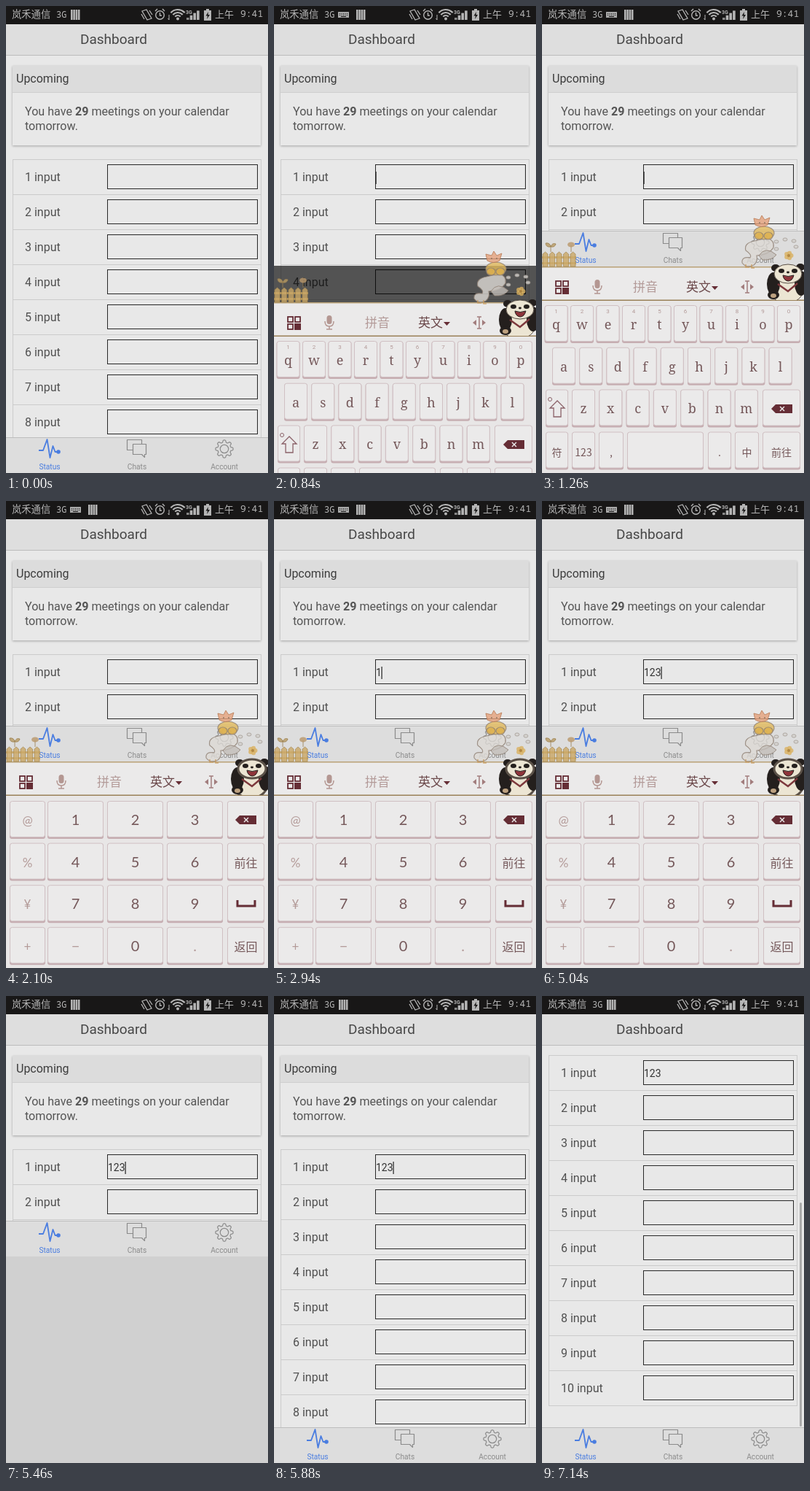
An HTML page with a canvas that plays this animation: 360 px wide and 640 px high, repeating every 8000 ms.

```html
<!DOCTYPE html>
<html lang="en">
<head>
<meta charset="utf-8">
<title>Dashboard input</title>
<style>
  html, body { margin: 0; width: 100%; height: 100%; overflow: hidden; background: #e8e8e8; }
  canvas { display: block; width: 360px; height: 640px; }
</style>
</head>
<body>
<canvas id="stage" width="360" height="640"></canvas>
<script>
const c = document.getElementById('stage').getContext('2d');
const LOOP = 8000, STEP = 420, LAST_STEP = 17;
const UI = 'Roboto, sans-serif';
const CJK = '"Noto Sans CJK SC", "Noto Sans CJK", sans-serif';
const MONO = '"Noto Sans Mono", monospace';
const DARK = '#652d35', PALE = '#b39a98', KEY_INK = '#75585a';

function text(s, x, y, size, color, { font = UI, align = 'left', weight = 400 } = {}) {
  c.font = `${weight} ${size}px ${font}`;
  c.textAlign = align;
  c.fillStyle = color;
  c.fillText(s, x, y);
}
function box(x, y, w, h, color) {
  c.fillStyle = color;
  c.fillRect(x, y, w, h);
}
function frame(x, y, w, h, color, width = 1) {
  c.strokeStyle = color;
  c.lineWidth = width;
  c.strokeRect(x + .5, y + .5, w - 1, h - 1);
}
function oval(x, y, rx, ry, fill, stroke) {
  c.beginPath();
  c.ellipse(x, y, rx, ry, 0, 0, 7);
  if (fill) { c.fillStyle = fill; c.fill(); }
  if (stroke) { c.strokeStyle = stroke; c.stroke(); }
}
function path(d, stroke, width = 1, fill) {
  const p = new Path2D(d);
  if (fill) { c.fillStyle = fill; c.fill(p); }
  if (stroke) { c.strokeStyle = stroke; c.lineWidth = width; c.stroke(p); }
}
function at(x, y, draw) {
  c.save();
  c.translate(x, y);
  draw();
  c.restore();
}

function statusBar(hasKeyboard) {
  const ink = '#b5b5b5', back = '#181717';
  box(0, 0, 360, 25, back);
  text('岚禾通信', 8, 16, 13.3, ink, { font: CJK });
  text('3G', 69, 16, 12, ink, { font: MONO });
  if (hasKeyboard) {
    box(88, 8, 15, 8, '#a8a8a8');
    for (let i = 0; i < 10; i++) box(90 + i % 5 * 2.5, 10 + (i > 4) * 2, 1, 1, back);
    box(92, 14, 7, 1, back);
  }
  for (let i = 0; i < 4; i++) box((hasKeyboard ? 113 : 89) + i * 3.3, 5, 2.6, 14, ink);
  path('M187 7L193 5L200 17L194 19ZM186 11L190 18M197 6L201 12', ink, 1.3);
  c.lineWidth = 1.4;
  oval(211.5, 12.5, 5.8, 5.8, null, ink);
  path('M211.5 9V13H214M205 7L208 4M218 7L215 4', ink, 1.4);
  path('M224 12V19M222.5 17L224 19', ink, 1);
  for (const r of [5, 9, 13]) {
    c.beginPath();
    c.arc(236, 18, r, -2.4, -.74);
    c.lineWidth = 2.2;
    c.stroke();
  }
  oval(236, 17.5, 2, 2, ink);
  text('3G', 247, 11, 7, ink, { weight: 700 });
  for (let i = 0; i < 4; i++) box(248 + i * 4.7, 16 - i * 3.2, 3.6, 3 + i * 3.2, i ? ink : '#888');
  box(272, 6, 10, 14, ink);
  box(275, 4, 4, 2, ink);
  path('M278 8L274.5 13.5H277L276 18L280 12H277.5Z', null, 1, back);
  text('上午', 287, 16, 13, ink, { font: CJK });
  text('9:41', 322, 15, 13, ink, { font: MONO });
}

function header() {
  box(0, 25, 360, 43, '#dedede');
  box(0, 67, 360, 1, '#bcbcbc');
  text('Dashboard', 102, 52, 19, '#474747');
}

function card() {
  c.save();
  c.shadowColor = 'rgba(0,0,0,.3)';
  c.shadowBlur = 3;
  c.shadowOffsetY = 1;
  box(9, 82, 341, 109, '#e8e8e8');
  c.restore();
  box(9, 82, 341, 36, '#dcdcdc');
  box(9, 118, 341, 1, '#cfcfcf');
  text('Upcoming', 14, 105, 16, '#3c3c3c');
  let x = 26;
  for (const [run, weight] of [['You have ', 400], ['29', 700], [' meetings on your calendar', 400]]) {
    text(run, x, 150, 16.1, '#555', { weight });
    x += c.measureText(run).width;
  }
  text('tomorrow.', 26, 170, 16.1, '#555');
}

function inputList(value, caret) {
  frame(9, 210, 342, 481, '#cbcbcb');
  for (let i = 0; i < 10; i++) {
    const y = 210 + i * 48;
    if (i) box(9, y, 342, 1, '#cbcbcb');
    text(`${i + 1} input`, 26, y + 30, 16, '#505050');
    frame(139, y + 7, 207, 34, '#282828');
  }
  text(value, 140, 240, 14, '#333');
  if (caret) box(139.5 + value.length * 8, 227, 1.2, 17, '#222');
}

function tabs() {
  box(0, 591, 360, 49, '#dddddd');
  box(0, 591, 360, 1, '#bdbdbd');
  const blue = '#4a7de0', gray = '#8b8b8b';
  c.lineJoin = 'round';
  path('M45 609H51L56.5 594L60.5 619L64.5 603L67.5 611H72', blue, 1.8);
  oval(72, 611, 2.8, 2.8, blue);
  path('M174 608.5H166.5V594.5H186.5V600M174.5 600.5H192.5V614.5H190.5V618.5L186.5 614.5H174.5Z', gray, 1.2);
  c.beginPath();
  for (let i = 0; i <= 96; i++) {
    const a = i / 96 * 2 * Math.PI, r = 10.6 + 1.5 * Math.tanh(2.5 * Math.cos(8 * a));
    c.lineTo(300 + r * Math.cos(a), 607 + r * Math.sin(a));
  }
  c.stroke();
  oval(300, 607, 5.7, 5.7, null, gray);
  ['Status', 'Chats', 'Account'].forEach((name, i) =>
    text(name, 60 + i * 120, 635, 10.2, i ? gray : blue, { align: 'center' }));
  c.lineJoin = 'miter';
}

function page({ short, value, caret, scroll, bar }) {
  const shift = short ? -283 : 0;
  box(0, 0, 360, 640, short ? '#d0d0d0' : '#e8e8e8');
  c.save();
  c.beginPath();
  c.rect(0, 68, 360, 523 + shift);
  c.clip();
  box(0, 68, 360, 572, '#e8e8e8');
  at(0, -scroll, () => { card(); inputList(value, caret); });
  if (bar) {
    c.beginPath();
    c.roundRect(354, bar[0], 3, bar[1], 1.5);
    c.fillStyle = '#aaa';
    c.fill();
  }
  c.restore();
  at(0, shift, tabs);
  header();
}

function key(x, y, w, label = '', size = 19, color = KEY_INK, font = 'Lato, sans-serif', weight = 400) {
  c.beginPath();
  c.roundRect(x, y + 1, w, 51, 3);
  c.fillStyle = '#c6adb1';
  c.fill();
  c.beginPath();
  c.roundRect(x + .5, y + .5, w - 1, 49, 3);
  c.fillStyle = '#ebeaea';
  c.fill();
  c.strokeStyle = '#d0c0c3';
  c.lineWidth = 1;
  c.stroke();
  text(label, x + w / 2, y + 33, size, color, { font, weight, align: 'center' });
}
function deleteIcon(y) {
  path(`M315 ${y}L321 ${y - 6}H344V${y + 6}H321Z`, null, 1, DARK);
  path(`M327 ${y - 3}L333 ${y + 3}M333 ${y - 3}L327 ${y + 3}`, '#eee', 1.4);
}

function numberKeys() {
  const columns = [[5, 49], [57, 77], [139, 77], [221, 77], [304, 51]];
  const rows = ['@123', '%456', '¥789', '+−0.'];
  rows.forEach((row, r) => columns.forEach(([x, w], i) => {
    const label = row[i] || ['', '前往', '', '返回'][r];
    const pale = i === 0 || '−.'.includes(label);
    const y = 411 + r * 57.6;
    if (i === 4) key(x, y, w, label, 16, KEY_INK, CJK, 300);
    else key(x, y, w, label, i ? 20 : 17, pale ? PALE : KEY_INK);
  }));
  deleteIcon(437);
  path('M318 547V555H342V547', DARK, 3);
}

function letterKeys() {
  const serif = '"Noto Serif", serif';
  [['qwertyuiop', 19.5, 35.5], ['asdfghjkl', 30, 37.2], ['zxcvbnm', 57, 37.3]].forEach(([row, x, pitch], r) =>
    [...row].forEach((letter, i) => {
      const y = 410 + r * 57.7, cx = x + i * pitch;
      key(cx - 16, y, 32, letter, 18, KEY_INK, serif, 300);
      if (!r) text((i + 1) % 10, cx, y + 11, 8, PALE, { align: 'center' });
    }));
  key(5, 525.5, 31);
  path('M21 541L11 551H16V563H26V551H31Z', '#8b6168', 1.3);
  c.lineWidth = 1;
  oval(11, 539, 2.5, 2.5, null, '#8b6168');
  key(303, 525.5, 52);
  deleteIcon(552);
  const bottom = [[5, 31, '符'], [41, 32, '123'], [78, 34, ','], [117, 105, ''], [228, 32, '.'], [265, 33, '中'], [303, 52, '前往']];
  for (const [x, w, label] of bottom) key(x, 583.5, w, label, 14, KEY_INK, CJK, 300);
}

function toolbar() {
  box(0, 357, 360, 47, '#ebeaea');
  box(0, 357, 360, 1.5, '#b9a177');
  box(0, 402.5, 360, 1.5, '#9a8158');
  for (let i = 0; i < 4; i++) {
    const x = 18 + i % 2 * 10, y = 376 + (i > 1) * 10;
    if (i === 3) box(x, y, 9, 9, DARK);
    else frame(x + .5, y + .5, 8, 8, DARK, 1.8);
  }
  c.beginPath();
  c.roundRect(72.5, 375, 7, 12, 3.5);
  c.fillStyle = '#b49792';
  c.fill();
  path('M70 383Q70 390 76 390T82 383M76 390V394M72 394H80', '#b49792', 1.5);
  text('拼音', 142, 391, 17, PALE, { font: CJK, align: 'center', weight: 300 });
  text('英文', 215, 391, 17, '#6b484a', { font: CJK, align: 'center', weight: 300 });
  path('M233 384H242L237.5 389Z', null, 1, DARK);
  path('M282 377V393M279 377H285M279 393H285', '#a27d7d', 1.5);
  path('M278 381V389L273 385ZM286 381V389L291 385Z', null, 1, '#a27d7d');
}

function fence() {
  const wood = '#cba866', edge = '#a0834c';
  box(0, 343, 47, 3, wood);
  box(0, 351, 47, 3, wood);
  for (let i = 0; i < 5; i++) {
    const x = i * 9.5 + 1;
    path(`M${x} 357V340L${x + 3.5} 337L${x + 7} 340V357Z`, edge, .8, wood);
  }
  path('M12 337V328M12 330Q5 331 5 325Q11 324 12 330Q14 324 19 326Q18 331 12 330M40 337V328', '#9b8152', 1, '#b89a63');
  oval(40, 327, 5, 3.5, '#b9976a');
}

function goose() {
  const line = '#8f8073';
  path('M292 322Q277 325 280 335Q289 341 286 345Q274 343 275 352Q281 360 291 355Q297 350 295 342Q312 341 318 331Q320 321 309 318Z', line, 1.2, '#dedad5');
  path('M298 342Q307 328 322 341Q316 349 303 348Z', line, 1, '#c3beb9');
  path('M280 354V358H285M288 354V359H292', '#c69759', 1.5);
  c.lineWidth = 1.2;
  oval(305, 311, 14, 9, '#e2ba5c', line);
  oval(298, 315, 6, 5, '#ddb04f', line);
  oval(311, 315, 6, 5, '#ddb04f', line);
  path('M291 291L299 293L302 287L306 293L313 290L310 300Q302 305 293 300Z', '#b87b55', 1, '#e3a07a');
  oval(299, 297, .9, .9, '#765');
  oval(306, 297, .9, .9, '#765');
  for (const [x, y] of [[322, 323], [334, 320], [346, 322], [322, 333], [349, 330]]) oval(x, y, 3, 2.1, '#d6d3cf', '#a39b94');
  for (let i = 0; i < 5; i++) oval(339 + 3.5 * Math.cos(i * 1.257), 342 + 3.5 * Math.sin(i * 1.257), 3, 3, '#d9b05f');
  oval(339, 342, 2, 2, '#a57a38');
}

function panda() {
  const black = '#241f1d', cream = '#ece5d3';
  c.save();
  c.beginPath();
  c.rect(305, 348, 55, 55);
  c.clip();
  oval(336, 389, 23, 18, cream, '#5b5148');
  oval(318, 381, 9, 16, black);
  oval(356, 380, 9, 17, black);
  oval(321, 359, 6, 5, black);
  oval(355, 358, 6, 5, black);
  oval(338, 367, 19, 13, cream, '#5b5148');
  oval(329, 363, 4, 3, black);
  oval(347, 363, 4, 3, black);
  oval(338, 365, 2, 1.4, black);
  path('M331 369Q338 372 346 369Q344 377 338 377Q332 376 331 369Z', black, 1, '#8e343a');
  path('M324 381L338 391L351 380', '#7d383c', 2.5);
  oval(318, 396, 8, 6, black);
  oval(318, 397, 4, 3, '#bda180');
  c.restore();
}

function keyboard(numeric) {
  box(0, 404, 360, 300, '#e8e6e6');
  toolbar();
  (numeric ? numberKeys : letterKeys)();
  c.save();
  c.globalAlpha = .8;
  fence();
  goose();
  c.restore();
  panda();
}

function render(time) {
  const step = Math.min(LAST_STEP, Math.floor(time % LOOP / STEP));
  const hasKeyboard = step >= 2 && step <= 12;
  const rising = step === 2;
  const typed = [7, 8, 10].filter(s => step >= s).length;
  page({
    short: step >= 3 && step <= 13,
    value: '123'.slice(0, typed),
    caret: step === 2 || step === 3 || (step >= 6 && step <= 14),
    scroll: step === 17 ? 129 : step === 16 ? 60 : 0,
    bar: step === 17 ? [283, 307] : step === 16 ? [130, 400] : null
  });
  if (rising) box(0, 356, 360, 52, 'rgba(0,0,0,.64)');
  if (hasKeyboard) at(0, rising ? 49 : 0, () => keyboard(step >= 4));
  statusBar(hasKeyboard);
}

const start = performance.now();
function tick() {
  render(performance.now() - start);
  requestAnimationFrame(tick);
}
tick();
</script>
</body>
</html>
```
